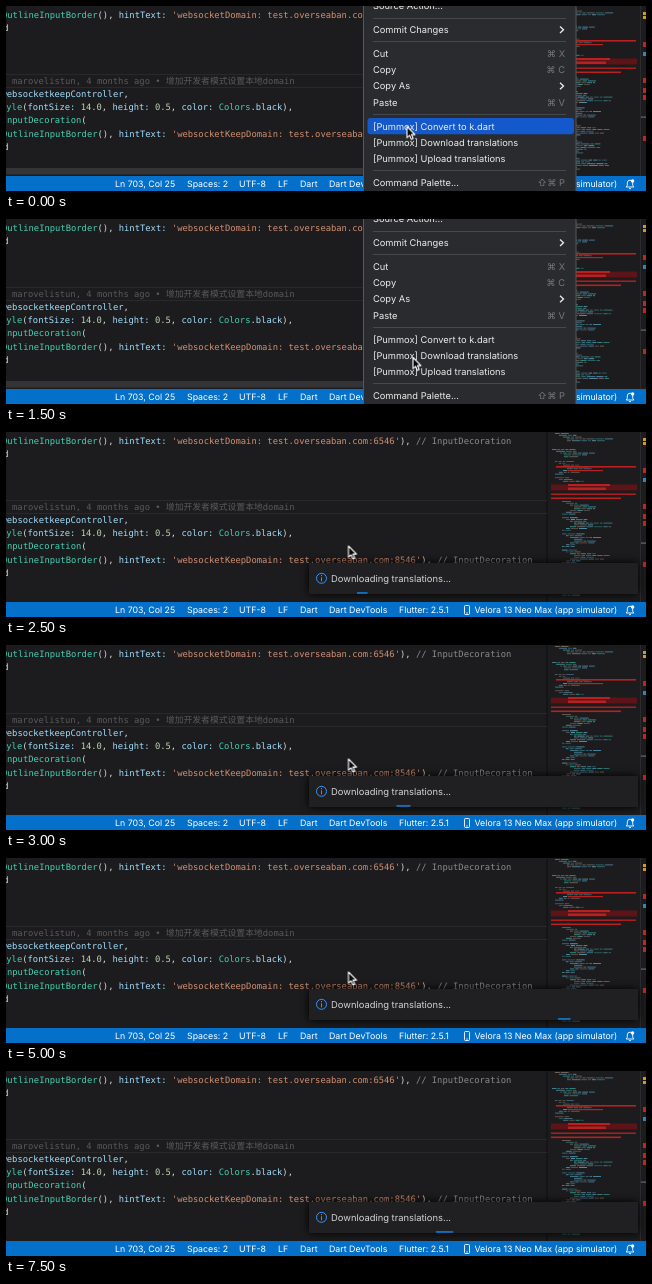
Write an HTML page with a canvas that moves like this. It is 640 px wide and 185 px high and loops after 8000 ms.

```html
<!DOCTYPE html>
<html lang="en">
<head>
<meta charset="utf-8">
<title>Editor: download translations</title>
<style>
html, body { margin: 0; width: 100%; height: 100%; overflow: hidden; background: #1c1b1d; }
#stage { position: relative; width: 640px; height: 185px; overflow: hidden; }
canvas, svg { position: absolute; left: 0; top: 0; display: block; }
text { white-space: pre; text-rendering: geometricPrecision; }

.code { font: 8.82px "DejaVu Sans Mono", "Noto Sans CJK SC", "Noto Sans CJK", monospace; fill: #dadada; }
.type { fill: #45d0b4; }
.name { fill: #a3e0ff; }
.str { fill: #d29074; }
.num { fill: #bdd6b2; }
.label { fill: #8b8b8b; }
.blame { fill: #5a5a5c; }

.ui { font-family: Inter, Roboto, sans-serif; }
.status { font-size: 8.8px; fill: #fff; }
.menu { font-size: 9.3px; fill: #ececec; }
.keys { fill: #77787a; font-family: Inter, "DejaVu Sans", sans-serif; text-anchor: end; }
.line { fill: none; stroke: #ececec; }

#menu, #scroll, #pick, #toast, #bar, #pointer { animation: 8s step-end infinite; }
#menu { animation-name: menu; }
#scroll { animation-name: scroll; }
#pick { animation-name: pick; }
#toast { animation-name: toast; }
#bar { animation-name: bar; }
#pointer { animation-name: pointer; }
#slide {
  transform-box: fill-box;
  transform-origin: center;
  animation: slide 4s -2s steps(4, end) infinite;
}

@keyframes menu { 0% { opacity: 1 } 25%, 100% { opacity: 0 } }
@keyframes scroll { 0% { opacity: 1 } 31.25%, 100% { opacity: 0 } }
@keyframes pick {
  0% { transform: none; opacity: 1 }
  12.5% { transform: translateY(16.2px); opacity: 1 }
  18.75%, 100% { transform: translateY(16.2px); opacity: 0 }
}
@keyframes toast {
  0% { opacity: 0; transform: translateY(14px) }
  25% { opacity: .45; transform: translateY(14px) }
  31.25%, 100% { opacity: 1; transform: none }
}
@keyframes bar { 0% { opacity: 0 } 31.25%, 100% { opacity: 1 } }
@keyframes pointer {
  0% { transform: translate(401px, 120.5px); opacity: 1 }
  12.5% { transform: translate(407px, 138.5px); opacity: 1 }
  31.25% { transform: translate(342.5px, 114px); opacity: 1 }
  93.75%, 100% { transform: translate(342.5px, 114px); opacity: 0 }
}
/* The bar widens to mid-track and narrows again, in eight hops. */
@keyframes slide {
  0% { transform: translateX(135%) scaleX(1.108) }
  49.99% { transform: translateX(2635%) scaleX(3.108) }
  50% { transform: translateX(2630%) scaleX(2.892) }
  100% { transform: translateX(5030%) scaleX(.892) }
}
</style>
</head>
<body>
<div id="stage">
<canvas id="map" width="640" height="185"></canvas>
<svg width="640" height="185" viewBox="0 0 640 185">
  <g fill="#29282a">
    <rect y="68" width="541" height="1"/>
    <rect y="81" width="541" height="1"/>
  </g>
  <rect id="scroll" y="162" width="357" height="6.5" fill="#343436"/>

  <g class="code">
    <text x="-4" y="12"><tspan class="type">OutlineInputBorder</tspan>(), <tspan class="name">hintText:</tspan> <tspan class="str">'websocketDomain: test.overseaban.com:6546'</tspan>), <tspan class="label">// InputDecoration</tspan></text>
    <text x="-2.7" y="25">d</text>
    <text x="6" y="77.7" class="blame">marovelistun, 4 months ago • 增加开发者模式设置本地domain</text>
    <text x="-4.5" y="91"><tspan class="name">websocketkeepController</tspan>,</text>
    <text x="-5" y="103.9"><tspan class="type">tyle</tspan>(<tspan class="name">fontSize:</tspan> <tspan class="num">14.0</tspan>, <tspan class="name">height:</tspan> <tspan class="num">0.5</tspan>, <tspan class="name">color:</tspan> <tspan class="type">Colors</tspan>.<tspan class="name">black</tspan>),</text>
    <text x="-4.3" y="117"><tspan class="type">InputDecoration</tspan>(</text>
    <text x="-4" y="130.5"><tspan class="type">OutlineInputBorder</tspan>(), <tspan class="name">hintText:</tspan> <tspan class="str">'websocketKeepDomain: test.overseaban.com:8546'</tspan>), <tspan class="label">// InputDecoration</tspan></text>
    <text x="-2.7" y="143.6">d</text>
  </g>

  <g id="toast">
    <rect x="303" y="131" width="329" height="31" fill="#202022" style="filter: drop-shadow(0 0 4px #000)"/>
    <g fill="none" stroke="#3794ff">
      <circle cx="315.5" cy="146.3" r="5"/>
      <path d="M315.5 145.3v4M315.5 143v1.2"/>
    </g>
    <text class="ui" x="325" y="149.8" font-size="9.4" fill="#d4d4d4">Downloading translations...</text>
    <g id="bar"><rect id="slide" x="303" y="159.8" width="6.58" height="1.9" fill="#0e70c0"/></g>
  </g>

  <rect y="170" width="640" height="15" fill="#0470ca"/>
  <g class="ui status">
    <text x="109" y="181">Ln 703, Col 25</text>
    <text x="181" y="181">Spaces: 2</text>
    <text x="233" y="181">UTF-8</text>
    <text x="272" y="181">LF</text>
    <text x="294" y="181">Dart</text>
    <text x="323" y="181">Dart DevTools</text>
    <text x="393" y="181">Flutter: 2.5.1</text>
    <text x="468.5" y="181">Velora 13 Neo Max (app simulator)</text>
  </g>
  <g fill="none" stroke="#fff" stroke-width=".9">
    <rect x="458.5" y="173.5" width="5" height="9" rx="1"/>
    <path d="M460.3 181h1.5"/>
    <path d="M620.2 181h7.6l-1.1-1.7v-2.4a2.7 2.7 0 0 0-5.4 0v2.4zM623 182.6h2"/>
  </g>
  <circle cx="626.6" cy="175" r="1.7" fill="#fff"/>

  <g id="menu">
    <rect x="357.5" y="-12" width="212.5" height="220" fill="#2a2b2e" stroke="#57585b"/>
    <path d="M367 12.5H560M367 35.5H560M367 108.5H560M367 164.5H560" stroke="#47484b"/>
    <rect id="pick" x="361.5" y="112" width="206.5" height="16.2" rx="3" fill="#1459cc"/>
    <g class="ui menu">
      <text x="367" y="3.2">Source Action...</text>
      <text x="367" y="27">Commit Changes</text>
      <text x="367" y="51">Cut</text>
      <text x="367" y="67.2">Copy</text>
      <text x="367" y="83.4">Copy As</text>
      <text x="367" y="99.6">Paste</text>
      <text x="367" y="123.5">[Pummox] Convert to k.dart</text>
      <text x="367" y="139.7">[Pummox] Download translations</text>
      <text x="367" y="156">[Pummox] Upload translations</text>
      <text x="367" y="179.8">Command Palette...</text>
      <g class="keys">
        <text x="559" y="51">⌘ X</text>
        <text x="559" y="67.2">⌘ C</text>
        <text x="559" y="99.6">⌘ V</text>
        <text x="559" y="179.8">⇧⌘ P</text>
      </g>
    </g>
    <path class="line" stroke-width="1.3" d="M554 20.5l3.5 3.2-3.5 3.2M554 76.8l3.5 3.2-3.5 3.2"/>
  </g>

  <g id="pointer">
    <path d="M0 0V11.2L2.6 8.8L4.3 12.8L6.2 12L4.5 8.1H8Z" fill="#080808" stroke="#fff" stroke-width="1.1" stroke-linejoin="round"/>
  </g>
</svg>
</div>
<script>
const ctx = document.getElementById('map').getContext('2d');
let seed = 41;
const rand = () => (seed = (seed * 16807) % 2147483647) / 2147483647;
const box = (color, x, y, w, h) => {
  ctx.fillStyle = color;
  ctx.fillRect(x, y, w, h);
};

box('#151416', 540, 0, 2, 170);

// Tiny code: nested blocks that step in and out again.
const inks = ['#2f9a8c', '#4a8fae', '#5fa3c0', '#7d6a5c'];
const block = (left, top, bottom, reach) => {
  for (let y = top, row = 0; y < bottom; y += 1.8, row++) {
    const step = row % 9;
    if (step === 8) continue;
    let x = left + Math.min(step, 7 - step) * 4;
    const end = x + 7 + rand() * (step > 1 && step < 6 ? reach : reach / 3);
    while (x < end) {
      const w = 2 + rand() * 7;
      ctx.globalAlpha = .5 + rand() * .4;
      box(inks[Math.floor(rand() * inks.length)], x, y, w, 1);
      x += w + 1;
    }
  }
  ctx.globalAlpha = 1;
};
block(549, 1, 9, 40);
block(546, 17, 26, 48);
block(549, 29, 50, 26);
block(556, 69, 166, 36);

// Lines with errors: x, y, width, height.
box('#5c1418', 545, 52.5, 86, 6);
const errors = [
  [550, 34, 80, 1.6], [562, 38, 35, 1.2], [562, 52, 42, 2],
  [562, 55.5, 38, 2.5], [545, 61.5, 85, 1.4], [545, 65.5, 70, 1.6]
];
errors.forEach(([x, y, w, h]) => box('#b8211f', x, y, w, h));

// Overview ruler.
box('#2b2b2d', 634, 0, 1, 170);
[6, 10].forEach(y => box('#d39a1c', 637, y, 3, 3));
box('#2f86b8', 637, 46, 3, 4);
[36, 72, 82, 89, 130].forEach(y => box('#c42420', 637, y, 3, 5));
box('#6a6a6c', 635, 110.5, 5, 1.2);
</script>
</body>
</html>
```
